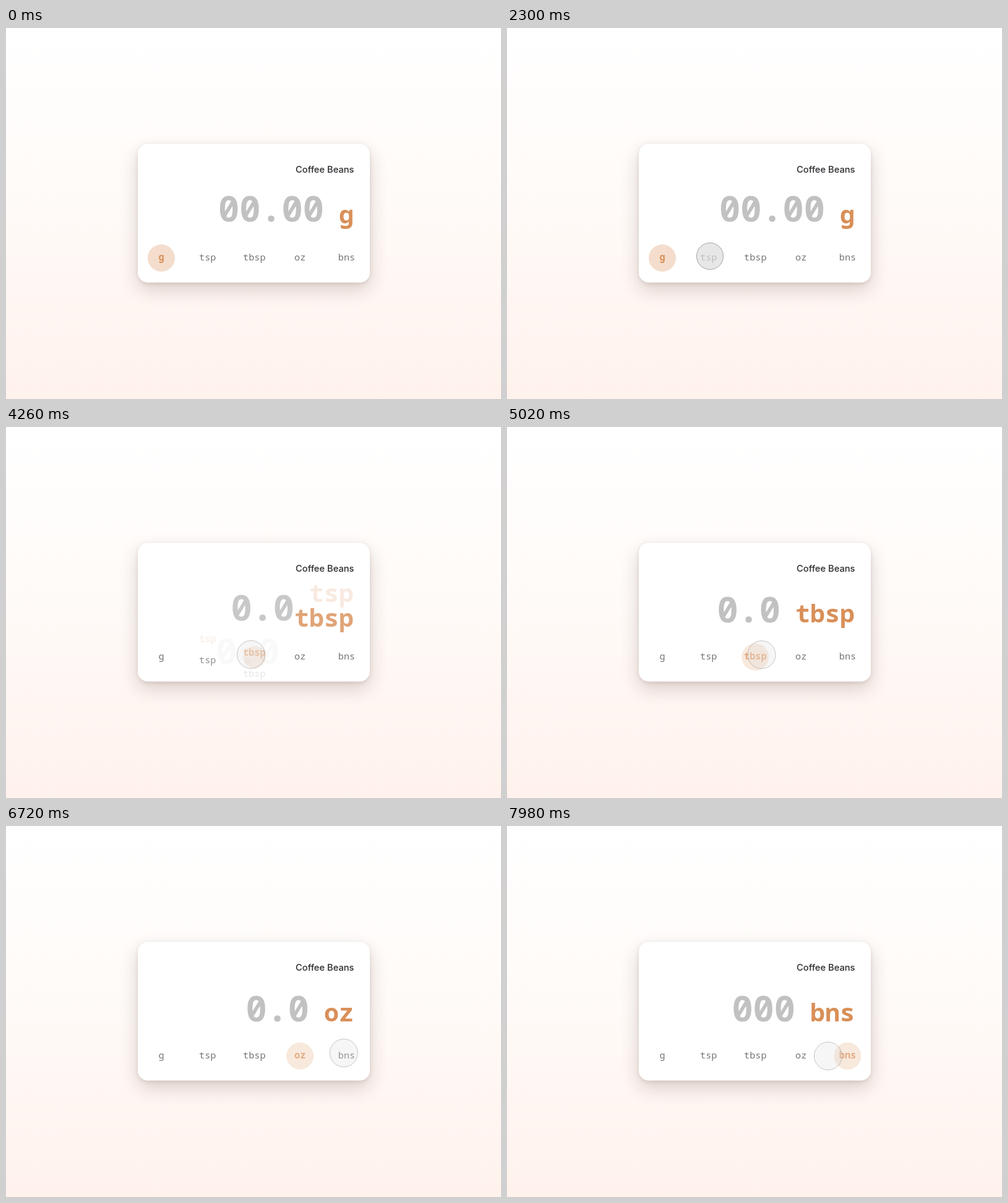
These frames come from a looping animation (800x600 px, 8 s). An HTML page with a canvas:

```html
<!DOCTYPE html>
<html lang="en">
<head>
<meta charset="utf-8">
<title>Unit switcher</title>
<style>
  html, body { margin: 0; width: 100%; height: 100%; overflow: hidden; background: #fff; }
  canvas { display: block; width: 800px; height: 600px; }
</style>
</head>
<body>
<canvas id="stage"></canvas>
<script>
const LOOP = 8000;
const MONO = '"Noto Sans Mono", "DejaVu Sans Mono", monospace';
const ORANGE = '#d98f58';
const RIGHT = 562;

const canvas = document.getElementById('stage');
const ctx = canvas.getContext('2d');
const ratio = window.devicePixelRatio || 1;
canvas.width = 800 * ratio;
canvas.height = 600 * ratio;
ctx.scale(ratio, ratio);

const units = [
  { name: 'g', value: '00.00', x: 251, base: 312.5, glow: 1 },
  { name: 'tsp', value: '0.0', x: 325.7, base: 316, glow: 0.67 },
  { name: 'tbsp', value: '0.0', x: 401.3, base: 316, glow: 0.67 },
  { name: 'oz', value: '0.0', x: 475.2, base: 316, glow: 0.67 },
  { name: 'bns', value: '000', x: 550.5, base: 316, glow: 0.67 }
];

// Switch n goes from unit n to unit n + 1.
const switches = [
  { press: 2300, hold: 80, start: 2380, leave: 167, travel: 40 },
  { press: 4000, hold: 80, start: 4080, leave: 167, travel: 40 },
  { press: 5500, hold: 120, start: 5740, leave: 67, travel: 50 },
  { press: 7020, hold: 80, start: 7110, leave: 167, travel: 50 }
];
const ENTER = 167;

const swing = u => (1 - Math.cos(Math.PI * u)) / 2;
const swingIn = u => 1 - Math.cos(Math.PI * u / 2);
const moves = [
  { from: 470, to: 1100, x: 328, y: 369 },
  { from: 3120, to: 3800, x: 396, y: 368 },
  { from: 4920, to: 5300, x: 490, y: 370 },
  { from: 5600, to: 5840, x: 479, y: 372 },
  { from: 6520, to: 6800, x: 561, y: 366 },
  { from: 7100, to: 7600, x: 557, y: 368 },
  { from: 7760, to: 7980, x: 519, y: 372, ease: swingIn }
];

const clamp = v => Math.max(0, Math.min(1, v));
const smooth = v => { const u = clamp(v); return u * u * (3 - 2 * u); };

// Critically damped spring from 0 to 1.
function spring(ms, speed) {
  if (ms <= 0) return 0;
  if (ms >= 520) return 1;
  const s = ms / 1000 * speed;
  return 1 - (1 + s) * Math.exp(-s);
}

function text(str, x, y, font, color, align, alpha = 1) {
  if (alpha <= 0.004) return;
  ctx.globalAlpha = alpha;
  ctx.font = font;
  ctx.fillStyle = color;
  ctx.textAlign = align;
  ctx.fillText(str, x, y);
  ctx.globalAlpha = 1;
}

function disc(x, y, r, color, alpha) {
  if (r <= 0.1) return;
  ctx.globalAlpha = alpha;
  ctx.fillStyle = color;
  ctx.beginPath();
  ctx.arc(x, y, r, 0, Math.PI * 2);
  ctx.fill();
  ctx.globalAlpha = 1;
}

function cardShape(offset, blur, color) {
  ctx.save();
  ctx.shadowColor = color;
  ctx.shadowBlur = blur * ratio;
  ctx.shadowOffsetY = offset * ratio;
  ctx.fillStyle = '#fff';
  ctx.beginPath();
  ctx.roundRect(213, 187.5, 375, 224, 16);
  ctx.fill();
  ctx.restore();
}

function drawCard() {
  const sky = ctx.createLinearGradient(0, 0, 0, 600);
  sky.addColorStop(0, '#ffffff');
  sky.addColorStop(0.5, '#fffaf7');
  sky.addColorStop(1, '#fff2ed');
  ctx.fillStyle = sky;
  ctx.fillRect(0, 0, 800, 600);
  cardShape(12, 30, 'rgba(70, 35, 25, 0.2)');
  cardShape(2, 6, 'rgba(70, 35, 25, 0.12)');
  text('Coffee Beans', RIGHT + 0.5, 234, '500 14.7px Inter, sans-serif', '#2c2c31', 'right');
}

function drawValue(unit, dy, alpha) {
  const x = RIGHT - 24 * (unit.name.length + 1);
  text(unit.value, x, unit.base + dy, `bold 57px ${MONO}`, '#c1c1c1', 'right', alpha);
}

function drawUnit(unit, dy, alpha) {
  text(unit.name, RIGHT, 316 + dy, `bold 40px ${MONO}`, ORANGE, 'right', alpha);
}

function drawLabel(unit, on) {
  disc(unit.x, 372, 22 * on, ORANGE, 0.3 * on * unit.glow);
  text(unit.name, unit.x, 376 + 34 * on, `15.2px ${MONO}`, '#757575', 'center', 1 - on);
  text(unit.name, unit.x, 376 - 34 * (1 - on), `bold 15.2px ${MONO}`, ORANGE, 'center', on * unit.glow);
}

function drawReadout(t) {
  let n = 0;
  while (n < 3 && t >= switches[n + 1].press) n++;
  const s = switches[n], old = units[n], next = units[n + 1];
  const age = t - s.start;
  const p = spring(age, 17.2);
  const out = spring(age - s.leave, 24);
  const enter = spring(age - ENTER, 24);

  drawValue(old, -67 * out, 1 - smooth(out / 0.22));
  drawValue(next, 70 * (1 - enter), Math.min(1, 2 * enter));
  drawUnit(old, -s.travel * p, 1 - p);
  drawUnit(next, s.travel * (1 - p), p);
  units.forEach((u, i) => drawLabel(u, i === n ? 1 - p : i === n + 1 ? p : 0));
}

function drawCursor(t) {
  if (t < moves[0].from) return;
  let x = 694, y = -24;
  for (const m of moves) {
    const k = (m.ease || swing)(clamp((t - m.from) / (m.to - m.from)));
    x += (m.x - x) * k;
    y += (m.y - y) * k;
  }
  let down = 0;
  for (const s of switches) {
    if (t >= s.press) down = 1 - smooth((t - s.press - s.hold) / 100);
  }
  const r = 23 - down;
  disc(x, y, r, '#dedede', 0.27 + 0.44 * down);
  ctx.strokeStyle = `rgba(110, 110, 110, ${0.4 + 0.2 * down})`;
  ctx.lineWidth = 0.9;
  ctx.beginPath();
  ctx.arc(x, y, r - 0.45, 0, Math.PI * 2);
  ctx.stroke();
}

function frame() {
  const t = performance.now() % LOOP;
  drawCard();
  drawReadout(t);
  drawCursor(t);
  requestAnimationFrame(frame);
}
frame();
</script>
</body>
</html>
```
